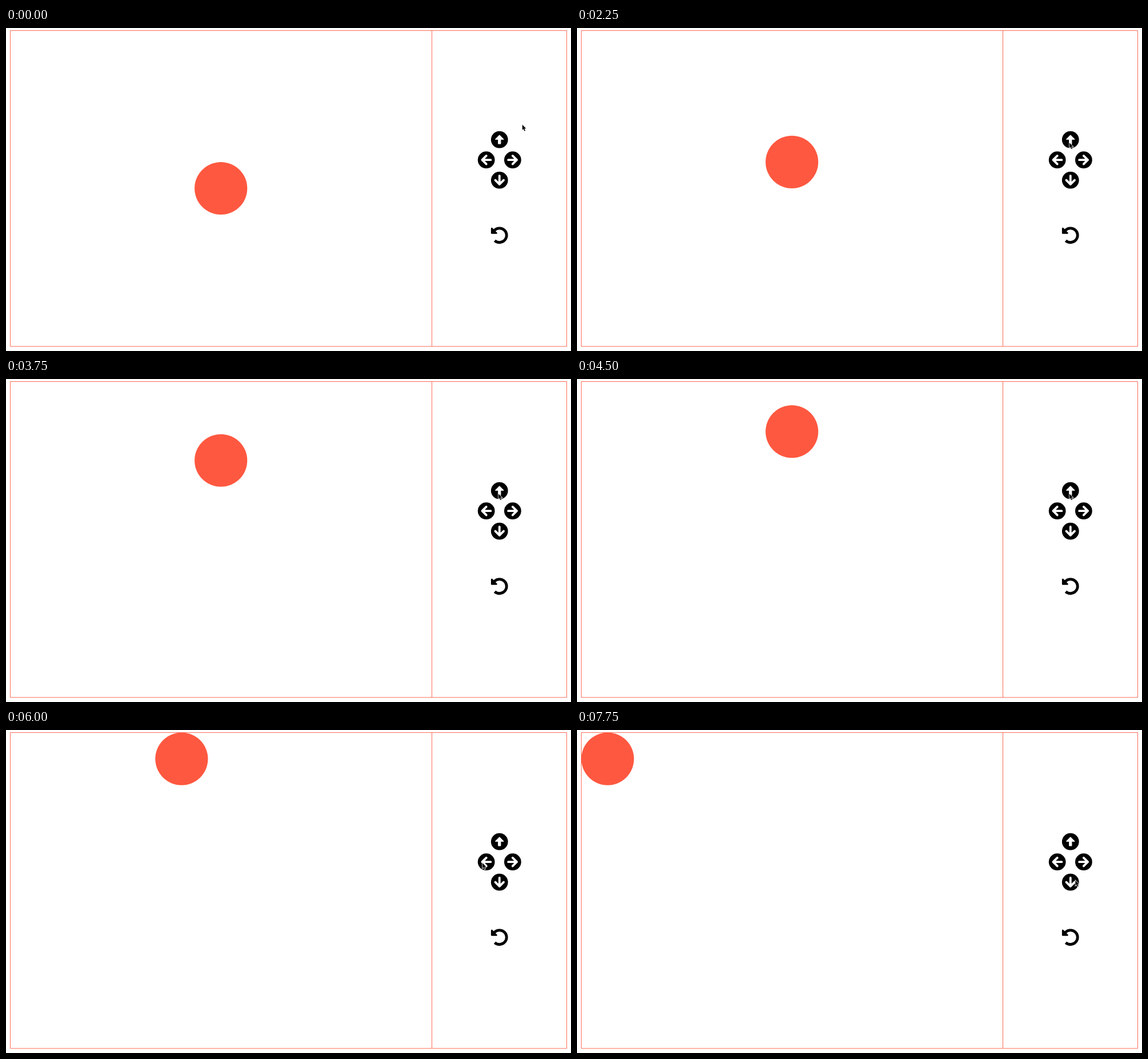
Animation of 989 by 566 pixels, one loop 8000 ms. Source, as an HTML page:

```html
<!DOCTYPE html>
<html lang="en">
<head>
<meta charset="utf-8">
<title>Ball controls</title>
<style>
  html, body { margin: 0; width: 100%; height: 100%; overflow: hidden; background: #fff; }
  svg { display: block; width: 989px; height: 566px; }
  #cursor { filter: drop-shadow(0 .8px .7px rgba(0, 0, 0, .35)); }
</style>
</head>
<body>
<svg viewBox="0 0 989 566" xmlns="http://www.w3.org/2000/svg">
  <defs>
    <!-- Icons are centred on the origin, 512 units wide -->
    <g id="block" stroke-linejoin="round">
      <circle r="248"/>
      <path d="M0-129 119-10H34V118H-34V-10H-119Z" fill="#fff" stroke="#fff" stroke-width="20"/>
    </g>
    <g id="arrow" stroke-linejoin="round" stroke-linecap="round">
      <circle r="248"/>
      <path d="M1-121-120 0 1 121M-120 0H129" fill="none" stroke="#fff" stroke-width="64"/>
    </g>
    <g id="undo" stroke="#000" stroke-linejoin="round">
      <path d="M-147-147A208 208 0 1 1-138 156" fill="none" stroke-width="80"/>
      <path d="M-224-198V-64H-90Z" stroke-width="48"/>
    </g>
  </defs>
  <path d="M7.5 4.5H981.5V558H7.5ZM745.5 4.5V558" fill="none" stroke="#ff5840" stroke-opacity=".88"/>
  <circle id="ball" r="46.1" fill="#ff5840"/>
  <g id="buttons"></g>
  <path id="cursor" d="M.8 1.5V10.8L2.9 8.8 4.4 12.6 6 12 4.5 8.2H7.3Z" stroke="#fff" stroke-width="1.5" paint-order="stroke"/>
</svg>
<script>
const LOOP = 8000, TICK = 250, GLIDE = 500, STEP = 46.08;
const HOME = { x: 376.2, y: 281 };
const PAD = { x: 863.8, y: 231.2, dx: 23.1, dy: 35.5 };
const $ = id => document.getElementById(id);

const button = (icon, col, row, turn = 0) =>
  `<use href="#${icon}" transform="translate(${PAD.x + col * PAD.dx} ${PAD.y + row * PAD.dy}) rotate(${turn}) scale(.06)"/>`;

$('buttons').innerHTML =
  button('block', 0, -1) + button('arrow', -1, 0) + button('arrow', 1, 0, 180) +
  button('arrow', 0, 1, -90) + button('undo', 0, 3.72);

// Click times: single clicks up, then a steady burst to the left
const upClicks = [1690, 2700, 3250, 3900, 4449];
const leftClicks = Array.from({ length: 7 }, (_, i) => 5645 + 196 * i);

// Pointer moves in order
const rest = [903, 168];
const moves = [
  { from: 0, to: 1000, x: 861, y: 206 },
  { from: 1250, to: 1500, x: 861, y: 199.5 },
  { from: 5000, to: 5500, x: 833.2, y: 231.5 },
  { from: 7000, to: 7250, x: 867, y: 343 },
  { from: 7250, to: 7750, x: 871.6, y: 262 }
];

const clamp = p => Math.min(1, Math.max(0, p));

// CSS "ease": cubic-bezier(.25, .1, .25, 1)
function ease(p) {
  const curve = (a, b, u) => 3 * a * u * (1 - u) ** 2 + 3 * b * u * u * (1 - u) + u ** 3;
  let lo = 0, hi = 1;
  for (let i = 0; i < 24; i++) {
    const mid = (lo + hi) / 2;
    if (curve(.25, .25, mid) < p) lo = mid; else hi = mid;
  }
  return curve(.1, 1, lo);
}

const travel = (clicks, t) =>
  clicks.reduce((sum, start) => sum + STEP * ease(clamp((t - start) / GLIDE)), 0);

// Each move slows down as it nears its end
const pointer = t => moves.reduce(([x, y], m) => {
  const p = 1 - (1 - clamp((t - m.from) / (m.to - m.from))) ** 3;
  return [x + (m.x - x) * p, y + (m.y - y) * p];
}, rest);

function draw(ms) {
  // The picture is held for each quarter second
  const t = Math.floor(ms % LOOP / TICK) * TICK;
  $('ball').setAttribute('cx', HOME.x - travel(leftClicks, t));
  $('ball').setAttribute('cy', HOME.y - travel(upClicks, t));
  $('cursor').setAttribute('transform', `translate(${pointer(t)})`);
}

const begin = performance.now();
function loop() {
  draw(performance.now() - begin);
  requestAnimationFrame(loop);
}
loop();
</script>
</body>
</html>
```
